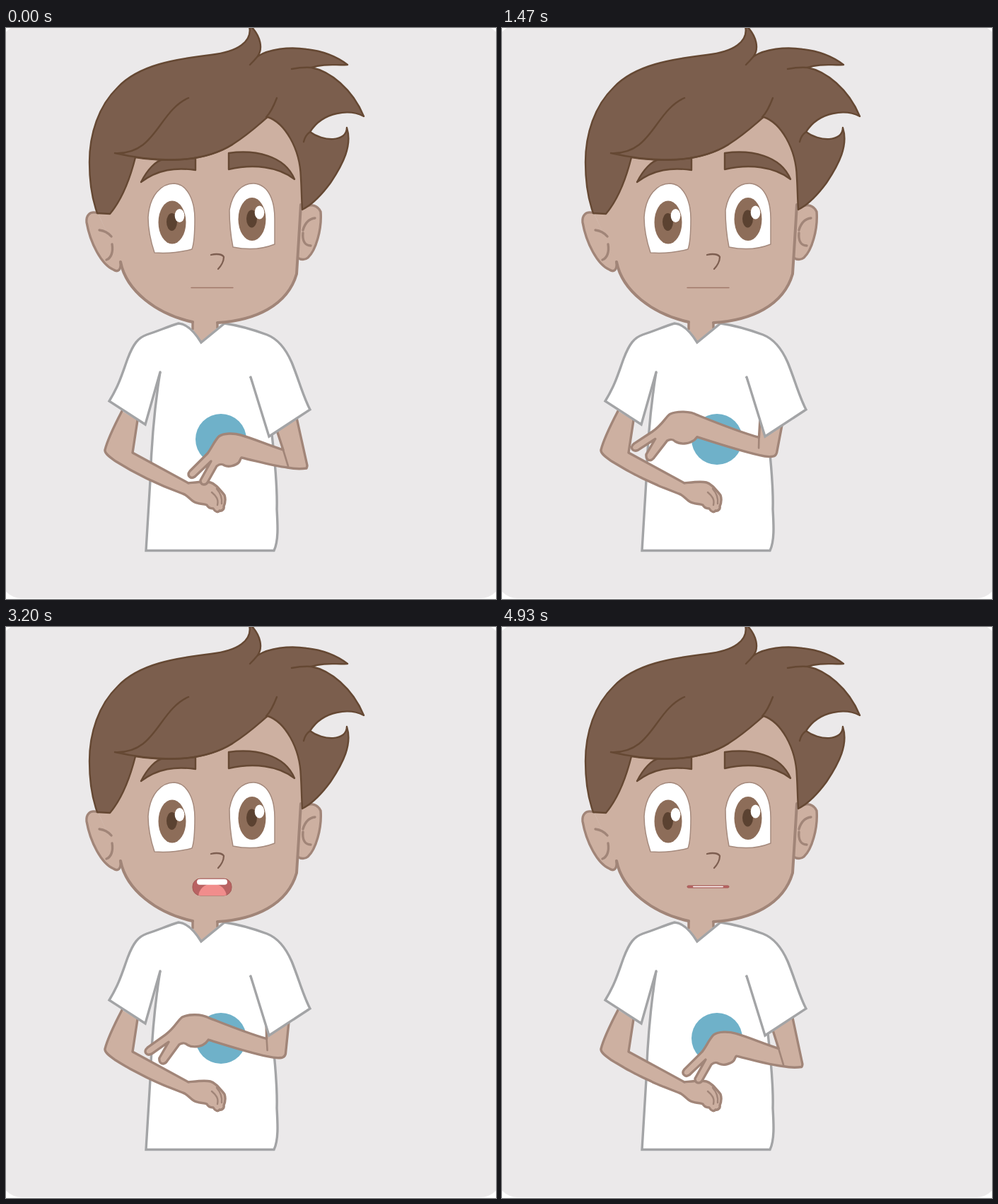
An HTML page that plays this animation: 693x808 px, repeating every 4.99 s.

```html
<!DOCTYPE html>
<html lang="en">
<head>
<meta charset="utf-8">
<title>Signing boy</title>
<style>
  html, body { margin: 0; width: 100%; height: 100%; overflow: hidden; background: #fff; }
  svg { display: block; width: 693px; height: 808px; }
  path { stroke-linecap: round; stroke-linejoin: round; }
  .skin { fill: #cdb0a1; stroke: #a18578; stroke-width: 3.4; }
  .hair { fill: #7b5e4d; stroke: #654833; stroke-width: 2.4; }
  .shirt { fill: #fff; stroke: #a3a4a6; stroke-width: 3.4; stroke-linejoin: miter; }
  .eye { fill: #fff; stroke: #a58a7d; stroke-width: 1.5; }
  .iris { fill: #8d6d59; }
  .pupil { fill: #5b4231; }
  .glint { fill: #fff; }
  .line { fill: none; }
  .bare { stroke: none; }
</style>
</head>
<body>
<svg viewBox="0 0 693 808">
  <rect x="-8" y="-4" width="709" height="811" rx="30" fill="#ebe9ea"/>

  <!-- torso and print -->
  <path class="shirt" d="M218 487C211 530 206 580 204 640L198 739.500H379C386 725 384 700 383 681C384 650 380 610 376 575L346 494L310 455H245Z"/>
  <circle cx="304" cy="582" r="36" fill="#6fb1c9"/>

  <!-- resting arm -->
  <path class="skin" d="M164 542C152 565 143 585 140 597C139 602 148 608 155 613C185 632 220 648 250 659C258 661 262 671 270 672C275 674 280 673 284 675C286 679 290 680 293 680C296 685 300 686 302 683C306 684 309 680 308 677C311 670 310 664 309 661C303 654 297 645 289 643C280 641 268 643 258 644C236 632 205 615 179 601L186 555"/>
  <path class="skin line" style="stroke-width:2.4" d="M291 657C297 662 301 667 299 675M298 652C304 659 306 665 305 673"/>

  <!-- moving arm -->
  <path id="arm" class="skin"/>
  <path id="crease" class="skin line" style="stroke-width:2.6"/>

  <!-- neck, sleeves and chest -->
  <path class="skin bare" d="M264 405H299V424L276 445L264 426Z"/>
  <path class="skin line" d="M264 413V426M299 415V424"/>
  <path class="shirt" d="M218 487L197 561L146 528C160 505 164 490 172 468C180 447 187 438 199 434C215 429 230 422 244 418Q260 419 276 445L309 418C330 421 350 427 369 434C387 441 397 457 404 473C415 500 420 521 430 540L372 578L346 494"/>

  <!-- ears and face -->
  <path class="skin" d="M418 256C428 248 440 249 445 260C447 285 438 315 427 325C422 329 417 328 412 325"/>
  <path class="skin line" d="M437 269C427 270 422 279 420 286M420 290C419 300 422 308 431 308"/>
  <path class="skin bare" d="M130 262L161 331C170 372 213 405 265 416H299C352 414 398 393 411 348L414 300L418 250V190C424 150 400 118 372 112L170 170Z"/>
  <path class="skin" d="M130 262C118 258 113 266 114 275C119 304 135 335 152 342C158 346 163 343 162 331" />
  <path class="skin line" d="M132 286Q142 287 149 295M150 306C152 318 148 326 142 328"/>
  <path class="skin line" style="stroke-width:4" d="M162 331C170 372 213 405 264 416M299 417C352 414 398 393 411 348L414 300L417 250"/>

  <!-- brows, eyes and nose -->
  <path class="hair" d="M191 218C200 200 212 188 222 186L268 184V201C240 197 215 200 191 218Z"/>
  <path class="hair" d="M315 177C352 172 394 180 408 214C385 196 350 192 315 200Z"/>
  <path class="eye" d="M210 318C204 300 201 285 201 268C203 236 220 220 238 220C257 221 267 245 267 270C267 290 266 305 263 313C245 318 225 319 210 318Z"/>
  <path class="eye" d="M321 310C317 290 316 275 316 258C320 232 335 219 351 220C372 222 380 245 380 270V306C360 314 340 314 321 310Z"/>
  <g id="eyes"></g>
  <path class="line" stroke="#7d5e50" stroke-width="2.3" d="M290 321C298 319 306 320 308 324C308 330 304 337 300 341"/>

  <!-- hair -->
  <path class="hair" d="M129 262C121 240 118 215 118 190C118 150 131 110 158 84C188 52 240 44 290 38C325 34 352 20 343 -6C362 12 363 30 356 40C372 30 400 26 425 30C452 33 470 42 483 52C465 53 450 50 432 56C458 61 490 86 506 125C487 115 449 117 430 147C448 161 482 162 482 141C490 166 477 192 459 219C445 238 433 250 419 257C418 242 418 228 417 212C416 170 394 134 370 126C358 136 345 149 320 165C285 187 235 191 183 183C175 215 163 244 147 263Z"/>
  <path class="hair line" d="M154 177C220 192 280 190 320 165M154 177C212 180 215 118 258 99M383 99C378 112 374 120 368 126M432 56Q420 55 404 58M430 147Q423 152 421 161M356 40Q351 46 345 52"/>

  <!-- mouth -->
  <path id="closed" class="line" stroke="#a0786a" stroke-width="1.4" d="M262 367.500H321"/>
  <g id="open">
    <clipPath id="clip"><rect id="hole"/></clipPath>
    <rect id="lips" fill="#b96363" stroke="#a35a55" stroke-width="1"/>
    <g clip-path="url(#clip)">
      <ellipse id="tongue" cx="292" fill="#f18d8c"/>
      <rect id="teeth" fill="#fff"/>
    </g>
  </g>
</svg>
<script>
const LOOP = 4990, TURN = 2000, STEP = 66.6;
const $ = id => document.getElementById(id);
const set = (id, attrs) => {
  for (const k in attrs) $(id).setAttribute(k, attrs[k]);
};
const mix = (a, b, p) => a + (b - a) * p;

// Blends two path strings that share the same commands.
function blend(a, b, p) {
  const to = b.match(/\d+/g);
  let i = 0;
  return a.replace(/\d+/g, n => mix(+n, +to[i++], p).toFixed(2));
}

const ARM = [
  "M392 597C370 590 350 581 332 576C322 573 308 573 301 578C295 584 291 594 285 602L260 627C255 633 261 639 267 635L290 613L275 640C275 648 283 647 285 643L298 620C303 616 306 617 309 619C315 622 325 619 329 615C331 613 331 610 333 608C355 613 378 620 398 622C408 624 418 624 425 623C426 621 426 620 426 619L404 520L367 520Z",
  "M353 573C320 564 290 552 255 537C247 531 225 530 214 535C207 540 203 550 186 560L160 574C152 580 158 587 166 583L190 570L178 590C177 599 183 602 189 596L210 571C216 568 219 570 222 573C230 578 242 577 247 574C251 573 253 571 255 568C290 580 320 590 351 598C358 600 364 601 368 600C373 600 374 597 375 594L404 520L367 520Z"
];
const CREASE = ["M392 597L399 620", "M353 573L350 585"];

// time, left, right, top, bottom, teeth height, tongue width, tongue top
const MOUTH = [
  [2000, 262, 321, 367, 368, 0, 30, 368],
  [3200, 264, 319, 356, 380, 8, 40, 363],
  [4200, 263, 320, 361, 375, 0, 34, 367],
  [4930, 262, 321, 366, 369, 1.5, 30, 369],
  [4990, 262, 321, 367, 368, 0, 30, 368]
];

function drawMouth(t) {
  const talking = t > TURN;
  $("open").style.display = talking ? "" : "none";
  $("closed").style.display = talking ? "none" : "";
  if (!talking) return;
  const i = MOUTH.findIndex(k => k[0] >= t);
  const a = MOUTH[i - 1], b = MOUTH[i];
  const p = (t - a[0]) / (b[0] - a[0]);
  const [, left, right, top, bottom, teeth, wide, tip] = a.map((v, n) => mix(v, b[n], p));
  const height = bottom - top;
  const box = { x: left, y: top, width: right - left, height, rx: Math.min(11, height / 2) };
  set("lips", box);
  set("hole", box);
  set("tongue", { cy: bottom + 2, rx: wide / 2, ry: Math.max(0, bottom + 2 - tip) });
  set("teeth", { x: 270, y: top + Math.min(.7, height / 4), width: 43, height: teeth, rx: teeth / 2 });
}

function draw() {
  const now = performance.now() % LOOP;
  const t = Math.min(Math.floor((now + 5) / STEP) * STEP, LOOP);
  const p = t < TURN ? t / TURN : (LOOP - t) / (LOOP - TURN);
  set("arm", { d: blend(...ARM, p) });
  set("crease", { d: blend(...CREASE, p) });
  drawMouth(t);
  requestAnimationFrame(draw);
}

const oval = (kind, x, y, rx, ry) =>
  `<ellipse class="${kind}" cx="${x}" cy="${y}" rx="${rx}" ry="${ry}"/>`;
$("eyes").innerHTML = [[235, 275], [348, 270.5]].map(([x, y]) =>
  oval("iris", x, y, 19.5, 30.5) +
  oval("pupil", x - .5, y - .5, 7.5, 12.5) +
  oval("glint", x + 10.5, y - 9.5, 6.8, 9.6)).join("");

draw();
</script>
</body>
</html>
```
